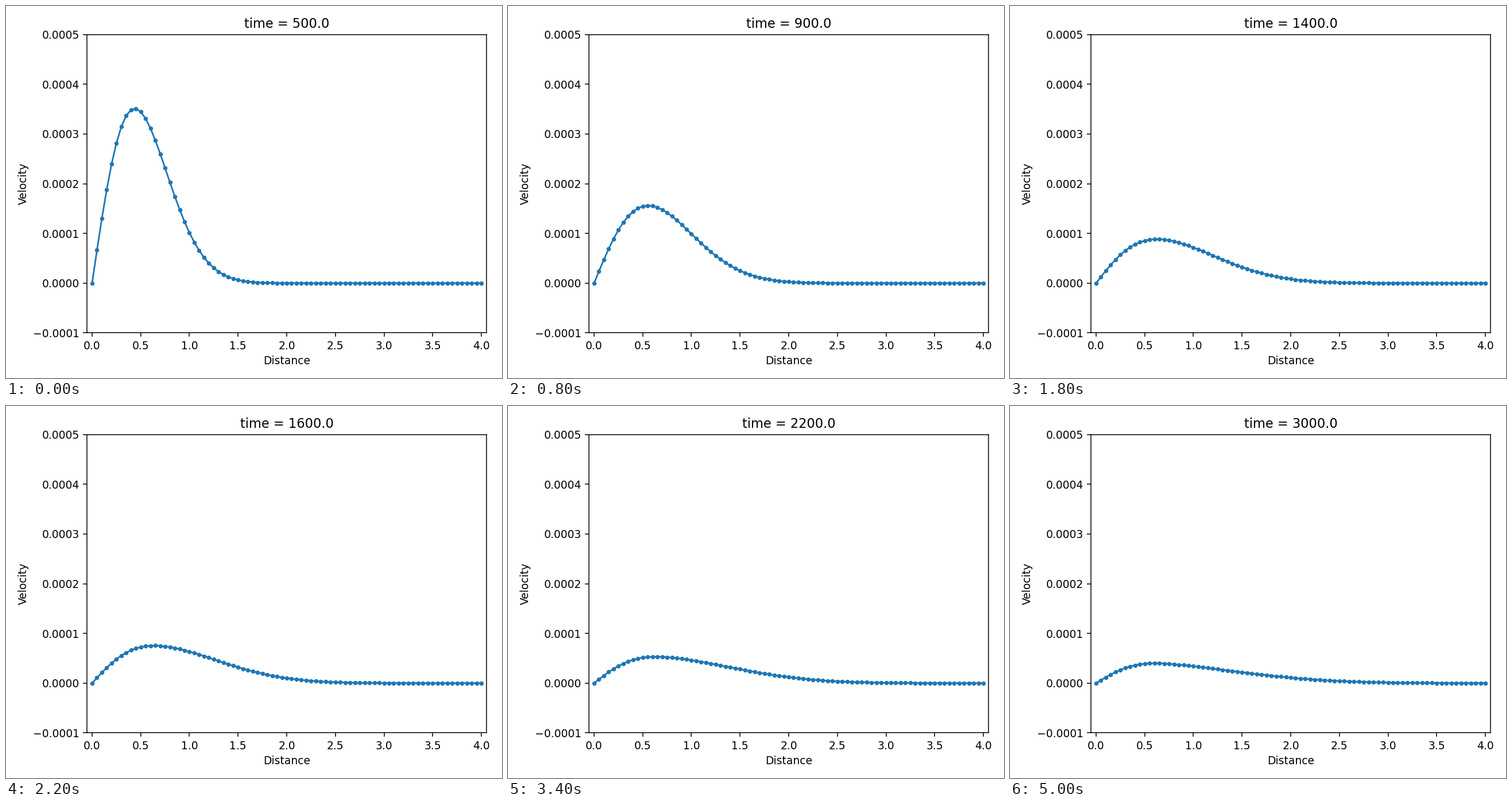
Animation, 864 px wide and 648 px high, one loop 5.2 s. Source, as a matplotlib script:

```python
import numpy as np
import matplotlib.pyplot as plt
from matplotlib.animation import FuncAnimation

plt.rcParams["font.family"] = "DejaVu Sans"

W, H, DPI = 864, 648, 135
LEFT, RIGHT, TOP, BOTTOM = 141, 837, 49.6, 569.4
STEPS, STEP_MS = 26, 200
START, DT = 500.0, 100.0

dist = np.linspace(0, 4, 81)


def velocity(t):
    """Spreading, decaying vortex plus a core that settles slowly."""
    s = t / START
    amp = 12.45 / s**2 + 0.015
    width = 0.397 * s / (1 + 0.00088 * s**3)
    gain = 0.21 - 0.045 / s
    core = 0.13 * s**0.28
    r = dist[1:]
    outer = np.exp(-r**2 / width)
    inner = np.exp(-r**2 / core)
    v = amp * r * outer + gain / r * (outer - inner)
    return np.concatenate(([0], v)) * 1e-4


def label(y, _):
    return f"{y:.4f}".replace("-0.0000", "0.0000").replace("-", "\u2212")


fig = plt.figure(figsize=(W / DPI, H / DPI), dpi=DPI)
ax = fig.add_axes((LEFT / W, 1 - BOTTOM / H, (RIGHT - LEFT) / W, (BOTTOM - TOP) / H))
line, = ax.plot(dist, velocity(START), ".-", color="#1f77b4")
ax.set_xlim(-0.053, 4.053)
ax.set_ylim(-0.0001, 0.0005)
ax.set_xticks(np.arange(0, 4.1, 0.5))
ax.set_yticks(np.arange(-1, 6) * 1e-4)
ax.yaxis.set_major_formatter(label)
ax.set_xlabel("Distance")
ax.set_ylabel("Velocity")
title = ax.set_title("")


def draw(i):
    t = START + DT * i
    line.set_ydata(velocity(t))
    title.set_text(f"time = {t:.1f}")
    return line, title


anim = FuncAnimation(fig, draw, frames=STEPS, interval=STEP_MS,
                     repeat=True, repeat_delay=0, blit=False)
plt.show()
```
